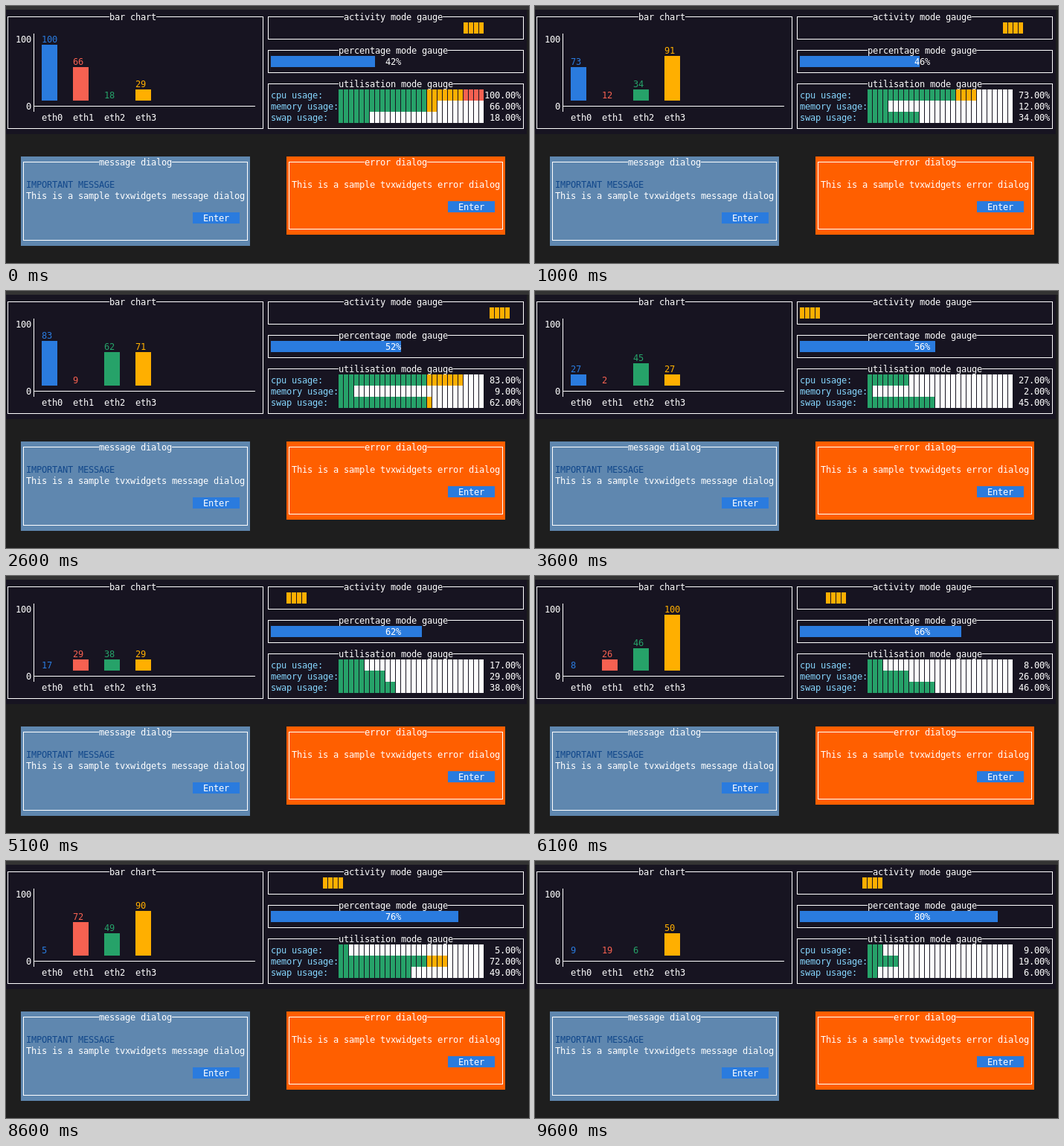
Recreate the animation shown at these times as an HTML page. Size 703 px wide and 345 px high, loop 9800 ms.

```html
<!DOCTYPE html>
<html lang="en">
<head>
<meta charset="utf-8">
<title>Terminal widgets</title>
<style>
html, body { margin: 0; width: 100%; height: 100%; overflow: hidden; background: #1e1e1e; }
svg { display: block; width: 703px; height: 345px; }
text { font: 12px "DejaVu Sans Mono", monospace; white-space: pre; }
</style>
</head>
<body>
<svg viewBox="0 0 703 345" shape-rendering="crispEdges"><g id="base"></g><g id="live"></g></svg>
<script>
const CELL = 7, ROW = 15, LOOP = 9800;
const DARK = '#171421', WHITE = '#fff', BLUE = '#2a7bde', RED = '#f66151',
      GREEN = '#26a269', AMBER = '#ffaf00', SKY = '#87d7ff';
const BAR_COLORS = [BLUE, RED, GREEN, AMBER];

// eth0..eth3 for each tick; the first three also feed the utilisation gauge
const LOADS = [
  [100, 66, 18, 29], [41, 87, 59, 8], [73, 12, 34, 91], [25, 54, 78, 47],
  [86, 38, 95, 25], [83, 9, 62, 71], [58, 76, 21, 40], [27, 2, 45, 27],
  [64, 31, 88, 56], [39, 94, 7, 82], [17, 29, 38, 29], [52, 68, 13, 75],
  [8, 26, 46, 100], [33, 81, 70, 14], [92, 57, 4, 36], [97, 40, 23, 66],
  [61, 15, 84, 3], [5, 72, 49, 90], [44, 35, 98, 62], [9, 19, 6, 50]
];

const rect = (x, y, w, h, fill) =>
  `<rect x="${x}" y="${y}" width="${w}" height="${h}" fill="${fill}"/>`;

// one glyph per terminal cell; y is the top of the row
function text(x, y, str, fill = WHITE) {
  const xs = [...str].map((_, i) => x + i * CELL).join(' ');
  return `<text x="${xs}" y="${y + 12}" fill="${fill}">${str}</text>`;
}

function frame(x, y, right, bottom, title, titleX, bg) {
  return rect(x, y, right - x + 1, 1, WHITE) + rect(x, bottom, right - x + 1, 1, WHITE) +
    rect(x, y, 1, bottom - y, WHITE) + rect(right, y, 1, bottom - y, WHITE) +
    rect(titleX, y - 7, title.length * CELL, ROW, bg) + text(titleX, y - 7, title);
}

const button = (x, y) => rect(x, y, 63, ROW, BLUE) + text(x + 14, y, 'Enter');

const block = (x, y, fill) => rect(x, y, CELL - 1, ROW, fill);

function drawBase() {
  const steel = '#5f87af', orange = '#ff5f00';
  return rect(0, 0, 703, 5, '#333') + rect(0, 5, 700, 167, DARK) +
    frame(2, 14, 345, 164, 'bar chart', 139, DARK) +
    frame(352, 14, 695, 44, 'activity mode gauge', 454, DARK) +
    frame(352, 59, 695, 89, 'percentage mode gauge', 447, DARK) +
    frame(352, 104, 695, 164, 'utilisation mode gauge', 447, DARK) +
    rect(37, 37, 1, 105, WHITE) + rect(37, 134, 298, 1, WHITE) +
    text(13, 37, '100') + text(27, 127, '0') +
    [0, 1, 2, 3].map(i => text(48 + i * 42, 142, 'eth' + i)).join('') +
    ['cpu', 'memory', 'swap'].map((n, i) => text(356, 112 + i * ROW, n + ' usage:', SKY)).join('') +
    rect(20, 202, 308, 120, steel) +
    frame(23, 209, 324, 314, 'message dialog', 125, steel) +
    text(27, 232, 'IMPORTANT MESSAGE', '#12488b') +
    text(27, 247, 'This is a sample tvxwidgets message dialog') + button(251, 277) +
    rect(377, 202, 294, 105, orange) +
    frame(380, 209, 667, 299, 'error dialog', 482, orange) +
    text(384, 232, 'This is a sample tvxwidgets error dialog') + button(594, 262);
}

function drawBar(value, i) {
  const x = 48 + i * 42, h = Math.floor(value / 20) * ROW, color = BAR_COLORS[i];
  return rect(x, 127 - h, 21, h, color) + text(x, 112 - h, String(value), color);
}

function drawUsage(value, i) {
  const y = 112 + i * ROW, used = Math.ceil(value * 28 / 100);
  let out = '';
  for (let c = 0; c < 28; c++) {
    const hot = c < 17 ? GREEN : c < 24 ? AMBER : RED;
    out += block(447 + c * CELL, y, c < used ? hot : WHITE);
  }
  return out + text(643, y, (value.toFixed(2) + '%').padStart(7));
}

function drawActivity(tick) {
  const start = tick < 7 ? 37 + tick : tick - 7;
  return [0, 1, 2, 3].map(i => block(356 + (start + i) * CELL, 22, AMBER)).join('');
}

function drawPercent(tick) {
  const pc = 42 + tick * 2;
  let cells = Math.floor(pc * 48 / 100);
  if (cells >= 22 && cells <= 24) cells++; // the label tints one cell ahead
  return rect(356, 67, cells * CELL, ROW, BLUE) + text(510, 67, pc + '%');
}

const live = document.getElementById('live');
let shown = -1;

function show(tick) {
  if (tick === shown) return;
  shown = tick;
  const loads = LOADS[tick];
  live.innerHTML = loads.map(drawBar).join('') + loads.slice(0, 3).map(drawUsage).join('') +
    drawActivity(tick) + drawPercent(tick);
}

function run() {
  const t = performance.now() % LOOP;
  show(Math.floor((t < 2100 ? t : t - 100) / 500));
  requestAnimationFrame(run);
}

document.getElementById('base').innerHTML = drawBase();
run();
</script>
</body>
</html>
```
